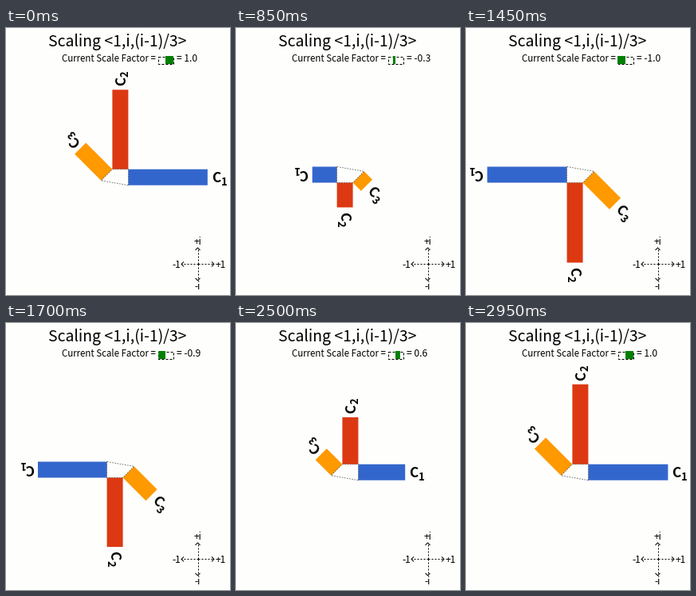
A matplotlib script for the animation above (3000 ms loop, 281x334 px).

```python
import numpy as np
import matplotlib.pyplot as plt
from matplotlib.animation import FuncAnimation
from matplotlib.patches import Polygon, Rectangle

W, H, DPI = 281, 334, 64
FRAMES, INTERVAL = 60, 50
PT = 72 / DPI  # points per pixel
plt.rcParams["font.family"] = ["Noto Sans CJK JP", "DejaVu Sans"]

fig = plt.figure(figsize=(W / DPI, H / DPI), dpi=DPI, facecolor="#fefefc")
ax = fig.add_axes([0, 0, 1, 1])
ax.set_xlim(0, W)
ax.set_ylim(H, 0)
ax.axis("off")


def label(x, y, s, size, **kw):
    kw = {"ha": "left", "va": "baseline", "color": "black", **kw}
    return ax.text(x, y, s, fontsize=size * PT, **kw)


def stroke(xs, ys, color="black", dash=None, width=1.0, z=3, **kw):
    style = (0, dash) if dash else "-"
    return ax.plot(xs, ys, color=color, lw=width * PT, ls=style, zorder=z,
                   dash_capstyle="butt", solid_capstyle="butt", **kw)[0]


# Static captions
label(139.5, 23, "Scaling <1,i,(i-1)/3>", 19.4, ha="center")
label(69.5, 42, "Current Scale Factor =", 11.5)
value = label(214, 42, "", 12)

# Gauge
stroke([190.5, 209.5, 209.5, 190.5, 190.5], [35.5, 35.5, 44.5, 44.5, 35.5],
       dash=(3, 2))
gauge = ax.add_patch(Rectangle((200, 35), 0, 10, fc="#008000", lw=0, zorder=4,
                               snap=False))

# Compass
CX, CY, ARM = 240.5, 295.4, 20.5
for dx, dy, name, lx, ly in [(1, 0, "+1", 269, 299.5), (-1, 0, "-1", 213.5, 299.5),
                             (0, -1, "+i", 240.5, 271), (0, 1, "-i", 240.5, 327)]:
    tx, ty = CX + ARM * dx, CY + ARM * dy
    stroke([CX, tx], [CY, ty], dash=(2, 2))
    bx, by = tx - 3 * dx, ty - 3 * dy
    stroke([bx - 3 * dy, tx, bx + 3 * dy], [by - 3 * dx, ty, by + 3 * dx])
    label(lx, ly, name, 12, ha="center")

# Hub and its three bars; every bar grows out of one side of the hub
CENTER = np.array([140.0, 185.1])
HUB = np.array([[13.4, 11.6], [13.4, -8.4], [-6.6, -8.4], [-20.74, 5.74]])
BARS = [("1", "#3366cc", 0, 100), ("2", "#dc3912", 90, 100),
        ("3", "#ff9900", 135, 100 * np.sqrt(2) / 3)]

hub = stroke([], [], color="#555555", dash=(2, 2), width=0.8, z=5, snap=False)
bars = []
for sub, color, angle, size in BARS:
    patch = ax.add_patch(Polygon(np.zeros((4, 2)), fc=color, lw=0, zorder=2,
                                 snap=False))
    kw = dict(rotation_mode="anchor", weight="bold")
    bars.append((patch, label(0, 0, "C", 17.3, **kw), label(0, 0, sub, 13, **kw)))


def update(n):
    s = round(np.cos(2 * np.pi * (n + 1) / FRAMES), 6) + 0.0
    flip = -1 if s < 0 else 1
    corners = CENTER + flip * HUB
    hub.set_data(*np.vstack([corners, corners[:1]]).T)

    for i, ((_, _, angle, size), (patch, big, small)) in enumerate(zip(BARS, bars)):
        turn = angle + (180 if flip < 0 else 0)
        a = np.radians(turn)
        along = np.array([np.cos(a), -np.sin(a)])
        down = np.array([np.sin(a), np.cos(a)])
        p, q = corners[i], corners[i + 1]
        reach = size * abs(s) * along
        patch.set_xy([p, q, q + reach, p + reach])
        end = (p + q) / 2 + reach
        for text, x, y in ((big, 5.2, 6.4), (small, 16.6, 10.4)):
            text.set_position(end + x * along + y * down)
            text.set_rotation(turn)

    gauge.set_x(min(200, 200 + 10 * s))
    gauge.set_width(10 * abs(s))
    value.set_text(f"= {round(s, 1) + 0.0:.1f}")
    return []


anim = FuncAnimation(fig, update, frames=FRAMES, interval=INTERVAL,
                     init_func=lambda: [], repeat=True, repeat_delay=0, blit=False)
plt.show()
```
